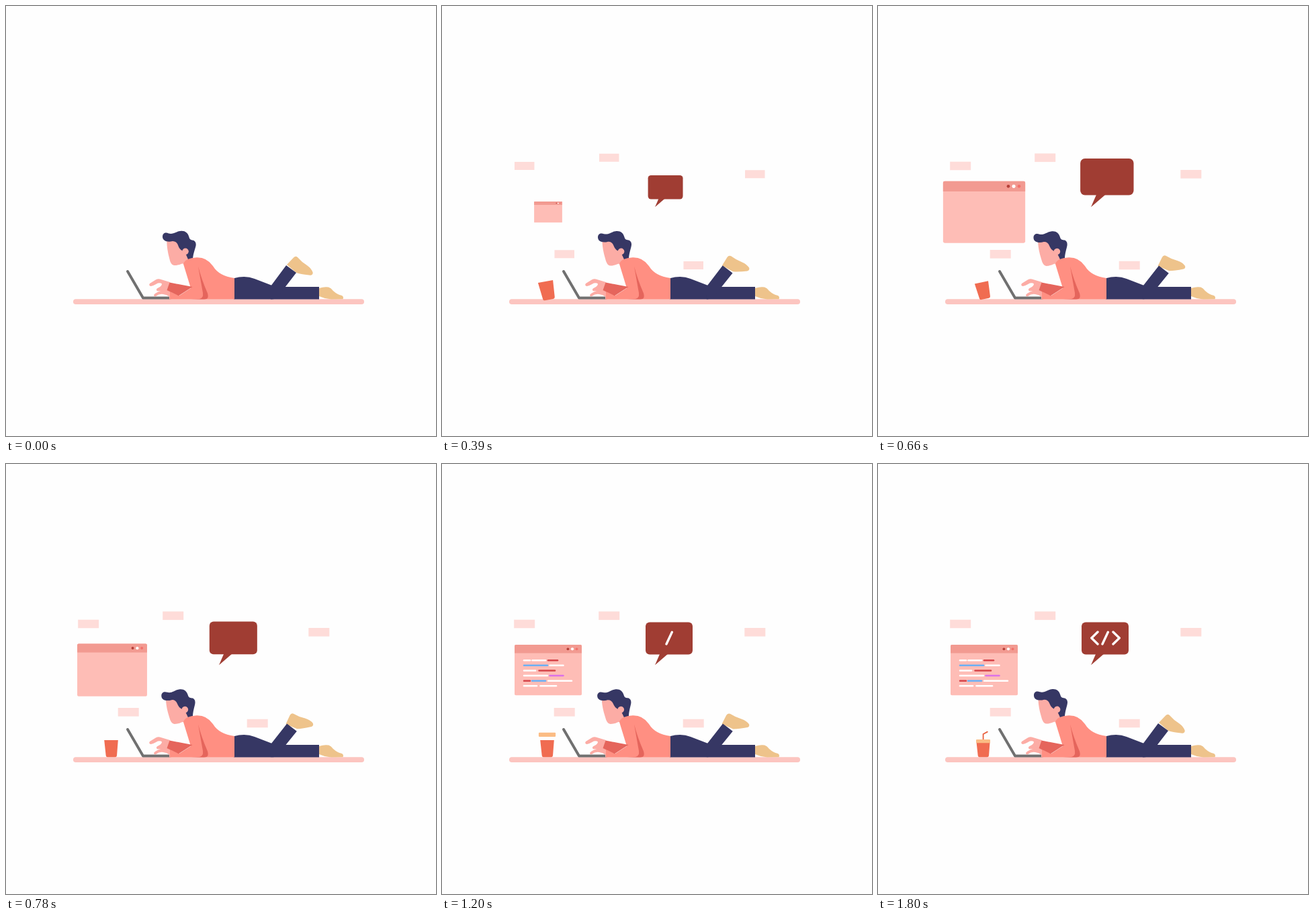
Write an HTML page that moves like this. It is 640 by 640 pixels and loops after 2430 ms.

```html
<!DOCTYPE html>
<html lang="en">
<head>
<meta charset="utf-8">
<title>Working on the floor</title>
<style>
html, body { margin: 0; width: 100%; height: 100%; overflow: hidden; background: #fefefe; }
svg { display: block; width: 100vw; height: 100vh; }
.line { fill: none; stroke-linecap: round; stroke-linejoin: round; }
</style>
</head>
<body>
<svg viewBox="0 0 640 640">
  <g id="tags" fill="#fedcd9"></g>

  <g id="panel">
    <rect x="108" y="269" width="100" height="75.3" rx="2" fill="#febdb6"/>
    <path d="M108 281.5V271Q108 269 110 269H206Q208 269 208 271V281.5Z" fill="#f29a91"/>
    <circle cx="187.4" cy="275.3" r="1.9" fill="#b53f38"/>
    <circle cx="194" cy="275.3" r="2.1" fill="#fff"/>
    <circle cx="200.5" cy="275.3" r="1.9" fill="#f2716b"/>
  </g>
  <g id="code" class="line" stroke-width="2.5"></g>

  <g id="bubble" fill="#a03d33">
    <rect x="303" y="235.5" width="70" height="48" rx="6"/>
    <path d="M324.5 282L317 299.3L337 282Z"/>
  </g>
  <g id="symbols" class="line" stroke="#fff" stroke-width="3.4">
    <path pathLength="1" d="M334 268L342.3 250.3"/>
    <path pathLength="1" d="M327 250L317.8 259L327 268"/>
    <path pathLength="1" d="M350 250L359.3 259L350 268"/>
  </g>

  <rect x="100" y="436.3" width="433" height="7.7" rx="3.8" fill="#fcc5c0"/>

  <path id="straw" class="line" d="M156.6 412V402L162.8 398.6" stroke="#e9603f" stroke-width="1.8"/>
  <path id="cup" d="M146.2 411H166.8L165 434Q164.8 436.2 162.5 436.2H151Q148.9 436.2 148.7 434Z" fill="#f06c51"/>
  <rect id="lid" x="146" y="410" width="21" height="5.3" rx="1" fill="#fbbc84"/>

  <path d="M466 420Q474 417.5 480 418.6Q483.500 419.500 487 424Q493 429.500 500 431Q503 433 501.500 436.300L484 436.500Q475 436 466 432Z" fill="#eec38b"/>
  <path d="M339 405.300Q356 400.500 370 406L396 416L411 418H466V436.500H339Z" fill="#363764"/>
  <path id="foot" d="M418 385L428 374.500Q431 371.500 434 374Q440 381 448 386Q455 391 456.800 397Q456.500 400.700 453 400.700Q440 399.500 432 397Z" fill="#eec38b"/>
  <path id="shin" d="M417 386L432 397L405 432Q402 436.500 394 436.500L394 417Z" fill="#363764"/>

  <g id="head">
    <path d="M239.300 350L256 347L272 362L271 384L262 383.500Q257 386 250 386Q245 385.500 243 375Q239.500 362 239.300 350Z" fill="#fcaca5"/>
    <path d="M233 343.500C233 338 237.500 336.500 242 338.400C250 340.500 253 335 261 334.800C267 334.600 271 338 272.500 344C273.500 348.500 276 348 279.500 349C283 351 283.300 355 282 359C280 366 278.500 370 278 377H271L268 370L262 364Q258 362 256 356Q254 350 248 350C240 352 233 349.500 233 343.500Z" fill="#363764"/>
    <circle cx="267" cy="365.300" r="4.800" fill="#fcaca5"/>
  </g>

  <path class="line" d="M181 395L204 434.400H244" stroke="#707070" stroke-width="4"/>
  <path d="M244 411L229 406.500Q225 405.500 222 408L214 413Q212 415.500 215 417Q218 417 226 412.500Q230 411.500 232 413.500Q232 417 225.500 420Q222.500 422 225 424.200L241 424Z" fill="#fcaca5"/>
  <path d="M246 425L237 422Q224 425 220 430Q220 433 223 432Q228 428 234 429Q241 430 243 433V436.500H246Z" fill="#fcaca5"/>
  <path d="M264 384Q266 375.500 284 374.300Q299 374 308 387Q317 402 340 405V436.500H244V425L258 431L275 420Z" fill="#ff8f82"/>
  <path d="M243.500 411.500L277.500 418L257 431.300L239.500 423Z" fill="#e5655c"/>
  <path d="M286 387.500Q291 407 299.800 427Q303 436.500 295 436.500H275L288 436Q294 435 293 427Z" fill="#e5655c"/>
</svg>
<script>
const LOOP = 2430, STEP = 30;
const $ = id => document.getElementById(id);

function add(parent, tag, attrs) {
  const el = document.createElementNS("http://www.w3.org/2000/svg", tag);
  for (const key in attrs) el.setAttribute(key, attrs[key]);
  return parent.appendChild(el);
}

const tags = [[122.7, 238], [248.7, 225.8], [465.8, 250.3], [182.2, 369.3], [374.2, 386]].map(([x, y]) => ({
  x, y, el: add($("tags"), "rect", { x: x - 15.5, y: y - 6.3, width: 31, height: 12.6 })
}));

// Code rows: colour, start, end of each stroke
const ink = { w: "#fff", r: "#d6454a", b: "#6bb0f5", p: "#dc72e8" };
const strokes = [
  "w 122 131 w 134.500 154 r 158 172",
  "b 122 157 w 160.500 180.500",
  "w 122 139 r 144.500 168",
  "w 122 157 p 160.500 180.500",
  "r 122 131 b 134 154 w 158 193",
  "w 122 141 w 146.500 170"
].flatMap((row, i) => row.match(/\w [\d.]+ [\d.]+/g).map(part => {
  const [color, from, to] = part.split(" ");
  const y = 292.2 + i * 7.63;
  return { row: i, from: +from, to: +to, el: add($("code"), "line", { x1: from, y1: y, y2: y, stroke: ink[color] }) };
}));

const symbols = [...$("symbols").children];

// Eased value through [time, value] keys
function ease(t, ...keys) {
  if (t <= keys[0][0]) return keys[0][1];
  for (let i = 1; i < keys.length; i++) {
    const [t0, a] = keys[i - 1], [t1, b] = keys[i];
    if (t < t1) {
      const u = (t - t0) / (t1 - t0);
      return a + (b - a) * u * u * (3 - 2 * u);
    }
  }
  return keys[keys.length - 1][1];
}

function pose(el, x, y, scale, angle = 0, dy = 0) {
  el.setAttribute("transform",
    `translate(${x} ${y + dy}) rotate(${angle}) scale(${scale}) translate(${-x} ${-y})`);
}

function show(el, on) {
  el.setAttribute("visibility", on ? "visible" : "hidden");
}

function draw(t) {
  const tagScale = ease(t, [30, 0], [445, 1]);
  for (const { x, y, el } of tags) pose(el, x, y, tagScale);

  pose($("panel"), 158, 306.6, ease(t, [286, 0], [562, 1.31], [842, 1]));
  pose($("bubble"), 317, 299, ease(t, [160, 0], [557, 1.2], [825, 1]));

  const typed = (t - 870) / 50;
  for (const { row, from, to, el } of strokes) {
    const end = Math.min(to, 122 + (typed - row * 0.6) * 30);
    el.setAttribute("x2", Math.max(from, end));
    show(el, end > from);
  }

  symbols.forEach((el, i) => {
    const drawn = i ? ease(t, [1230, 0], [1500, 1]) : ease(t, [1020, 0], [1200, 1]);
    el.setAttribute("stroke-dasharray", `${drawn} 2`);
    show(el, drawn > 0);
  });

  pose($("cup"), 156.5, 423.5,
    ease(t, [60, 0], [370, 1.1], [530, 1]),
    ease(t, [300, 0], [520, -29], [770, 0]));
  pose($("lid"), 156.5, 412.7,
    ease(t, [1020, 0], [1200, 1.2], [1380, 1]), 0,
    ease(t, [1200, -9.8], [1380, 0]));
  pose($("straw"), 156.6, 412, ease(t, [1380, 0], [1610, 1]));

  const kick = Math.sin(Math.PI * Math.min(t, 1800) / 1800);
  pose($("foot"), 424, 391, 1, -19 * kick);
  pose($("shin"), 400, 430, 1, 1.5 * kick);
  pose($("head"), 270, 378, 1, -3.2 * Math.sin(Math.PI * Math.min(t, 1800) / 2200));
}

const start = performance.now();
function tick() {
  const t = (performance.now() - start) % LOOP;
  draw(Math.floor(t / STEP) * STEP);
  requestAnimationFrame(tick);
}
tick();
</script>
</body>
</html>
```
